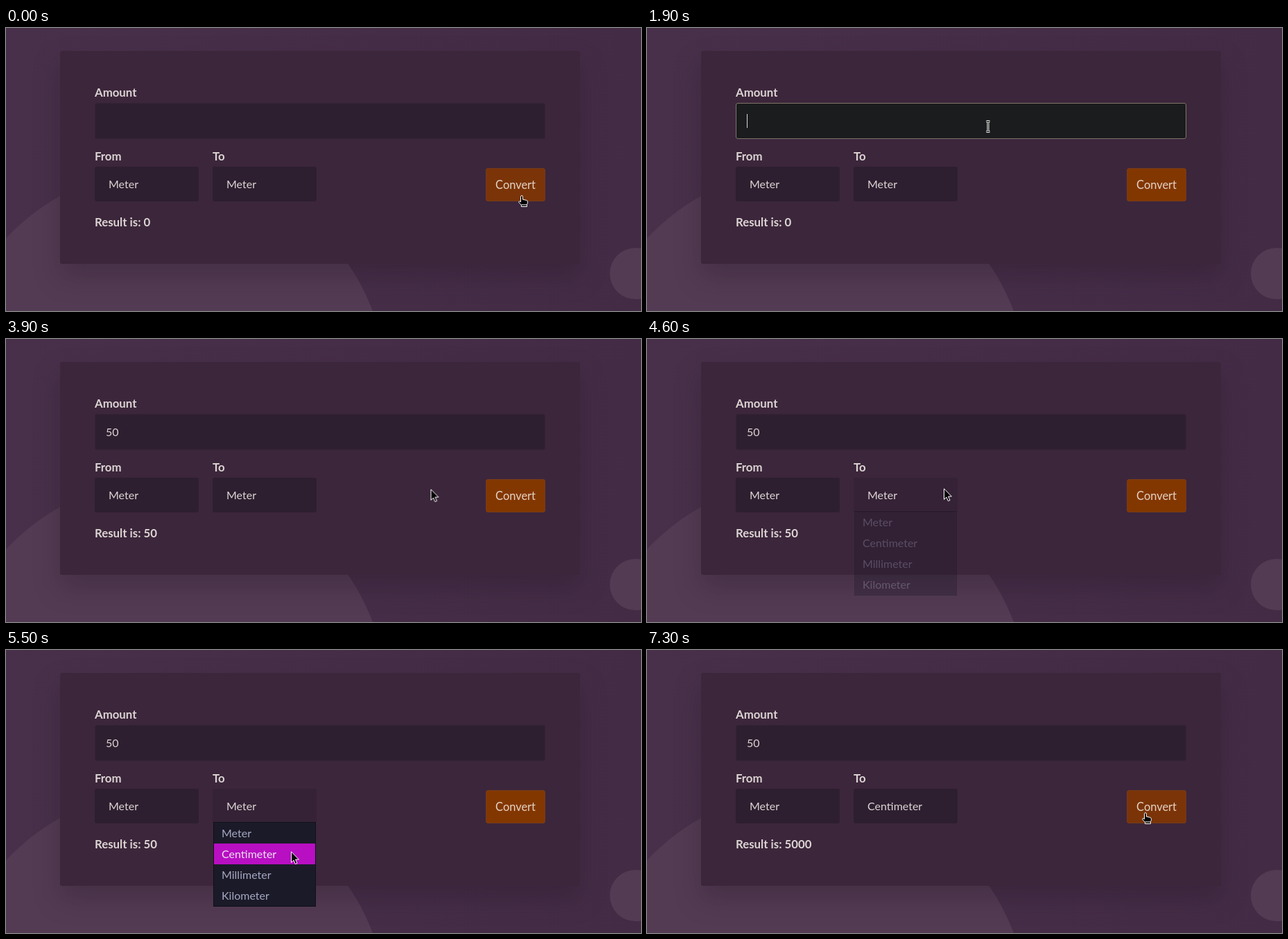
Recreate the animation shown at these times as an HTML page. Size 916 by 408 pixels, loop 8000 ms.

```html
<!DOCTYPE html>
<html lang="en">
<head>
<meta charset="utf-8">
<title>Unit converter</title>
<style>
html, body { margin: 0; width: 100%; height: 100%; overflow: hidden; background: #452d47; }
svg { display: block; width: 916px; height: 408px; }
text { font: 400 16px Lato, "Open Sans", sans-serif; fill: #dcd5d3; }
.label { font-weight: 700; font-size: 16.8px; }
.button-text { font-size: 16.4px; fill: #e4d3c4; }
.menu text { fill: #a6a9c4; }
.menu .hot text { fill: #ece3f0; }
.card { fill: #3c263b; filter: drop-shadow(0 18px 18px rgba(30, 14, 32, .26)); }
.box { fill: #2e1f30; }
.box.amount { stroke: #7f7467; stroke-opacity: 0; }
.button { fill: #833700; stroke: #8a4a18; stroke-opacity: .5; }

/* Every part shares one 8 s clock; 1.25% is a 100 ms tick. */
.anim { animation: 8s step-end -10ms infinite; }
.hidden { opacity: 0; }

.cursor { animation-name: move; }
@keyframes move {
  0% { transform: translate(739px, 241px); }
  2.5% { transform: translate(738px, 240px); }
  11.25% { transform: translate(655px, 212px); }
  12.5% { transform: translate(530px, 141px); }
  13.75% { transform: translate(489px, 133px); }
  30% { transform: translate(570px, 165px); }
  31.25% { transform: translate(668px, 205px); }
  32.5% { transform: translate(704px, 221px); }
  35% { transform: translate(705px, 223px); }
  46.25% { transform: translate(705px, 223px); animation-timing-function: steps(4); }
  51.25% { transform: translate(520px, 209px); animation-timing-function: steps(3); }
  55% { transform: translate(430px, 213px); animation-timing-function: steps(2); }
  57.5% { transform: translate(428px, 215px); }
  60% { transform: translate(428px, 215px); animation-timing-function: steps(7); }
  68.75% { transform: translate(411px, 290px); }
  75% { transform: translate(425px, 292px); }
  76.25% { transform: translate(469px, 294px); animation-timing-function: steps(4); }
  81.25% { transform: translate(620px, 262px); animation-timing-function: steps(3); }
  85%, 100% { transform: translate(714px, 234px); }
}

.hand { animation-name: hand; }
@keyframes hand {
  0%, 32.5%, 85%, 100% { opacity: 1; }
  11.25%, 47.5% { opacity: 0; }
}
.arrow { animation-name: arrow; }
@keyframes arrow {
  0%, 12.5%, 32.5%, 85%, 100% { opacity: 0; }
  11.25%, 30%, 47.5% { opacity: 1; }
}
.beam { animation-name: beam; }
@keyframes beam {
  12.5% { opacity: 1; }
  30% { opacity: 0; }
}

.button { animation-name: button; }
@keyframes button {
  0%, 32.5%, 85%, 100% { fill: #7b3408; }
  11.25%, 47.5% { fill: #833700; }
}

.amount { animation-name: amount; }
@keyframes amount {
  12.5% { fill: #332135; stroke-opacity: 0; }
  17.5% { fill: #332135; stroke-opacity: 1; animation-timing-function: steps(5); }
  23.75% { fill: #1a1c1d; stroke-opacity: 1; }
  37.5% { fill: #1a1c1d; stroke-opacity: 1; animation-timing-function: steps(5); }
  43.75%, 100% { fill: #2e1f30; stroke-opacity: 0; }
}

.caret { animation-name: caret; }
@keyframes caret {
  17.5% { opacity: 1; transform: none; }
  25% { opacity: 0; transform: none; }
  26.25% { opacity: 1; transform: translateX(10px); }
  28.75% { opacity: 1; transform: translateX(19px); }
  32.5% { opacity: 0; transform: none; }
}
.five { animation-name: five; }
@keyframes five { 26.25% { opacity: 1; } 28.75% { opacity: 0; } }
.fifty { animation-name: fifty; }
@keyframes fifty { 28.75%, 100% { opacity: 1; } }

.result0 { animation-name: result0; }
@keyframes result0 { 38.75%, 100% { opacity: 0; } }
.result50 { animation-name: result50; }
@keyframes result50 { 38.75% { opacity: 1; } 91.25% { opacity: 0; } }
.result5000 { animation-name: result5000; }
@keyframes result5000 { 91.25%, 100% { opacity: 1; } }

.to { animation-name: to; }
@keyframes to { 55% { fill: #352236; } 75% { fill: #2e1f30; } }
.to-meter { animation-name: to-meter; }
@keyframes to-meter { 75%, 100% { opacity: 0; } }
.to-centi { animation-name: to-centi; }
@keyframes to-centi { 75%, 100% { opacity: 1; } }

.menu { animation-name: menu; }
@keyframes menu {
  57.5% { opacity: .3; }
  58.75% { opacity: 1; }
  75% { opacity: 0; }
}
.hot-meter { animation-name: hot-meter; }
@keyframes hot-meter { 65% { opacity: 1; } 67.5% { opacity: 0; } }
.hot-centi { animation-name: hot-centi; }
@keyframes hot-centi { 67.5% { opacity: 1; } 75% { opacity: 0; } }
</style>
</head>
<body>
<svg viewBox="0 0 916 408">
  <defs>
    <linearGradient id="wall">
      <stop stop-color="#48304a"/>
      <stop offset="1" stop-color="#432b45"/>
    </linearGradient>
  </defs>
  <rect width="916" height="408" fill="url(#wall)"/>
  <g fill="#533b53">
    <circle cx="232" cy="519.7" r="317.3"/>
    <circle cx="908" cy="354" r="37"/>
  </g>
  <rect class="card" x="78" y="33" width="750" height="307" rx="3"/>

  <text class="label" x="128" y="99">Amount</text>
  <rect class="box amount anim" x="128.5" y="108.5" width="649" height="51" rx="2.5"/>
  <text class="five anim hidden" x="144" y="140">5</text>
  <text class="fifty anim hidden" x="144" y="140">50</text>
  <rect class="caret anim hidden" x="144" y="124" width="1" height="20" fill="#e0d8d4"/>

  <text class="label" x="128" y="191">From</text>
  <rect class="box" x="128" y="200" width="150" height="50" rx="3"/>
  <text x="148" y="231">Meter</text>

  <text class="label" x="298" y="191">To</text>
  <rect class="box to anim" x="298" y="200" width="150" height="50" rx="3"/>
  <text class="to-meter anim" x="318" y="231">Meter</text>
  <text class="to-centi anim hidden" x="318" y="231">Centimeter</text>

  <rect class="button anim" x="692.5" y="202.5" width="85" height="47" rx="2.5"/>
  <text class="button-text" x="735" y="232" text-anchor="middle">Convert</text>

  <text class="label result0 anim" x="128" y="286">Result is: 0</text>
  <text class="label result50 anim hidden" x="128" y="286">Result is: 50</text>
  <text class="label result5000 anim hidden" x="128" y="286">Result is: 5000</text>

  <g class="menu anim hidden">
    <rect x="299.5" y="248.5" width="147" height="121" fill="#1b1a28" stroke="#10101a"/>
    <text x="311" y="270">Meter</text>
    <text x="311" y="300">Centimeter</text>
    <text x="311" y="330">Millimeter</text>
    <text x="311" y="360">Kilometer</text>
    <g class="hot hot-meter anim hidden">
      <rect x="300" y="249" width="146" height="30" fill="#b80fc3"/>
      <text x="311" y="270">Meter</text>
    </g>
    <g class="hot hot-centi anim hidden">
      <rect x="300" y="279" width="146" height="30" fill="#b80fc3"/>
      <text x="311" y="300">Centimeter</text>
    </g>
  </g>

  <g class="cursor anim" stroke="#fff" stroke-linejoin="round">
    <g class="hand anim">
      <path d="M3.5 9.8V2.3Q3.5.6 5 .6T6.4 2.3V6.2L11.6 7.3Q13.4 7.8 13.4 9.5V11.5L12.4 13.6V16.5H4.4V14.2L.9 10.6Q.3 8.8 1.8 8.7Z"/>
      <path d="M4.6 13.9H12.2" fill="none"/>
    </g>
    <path class="arrow anim hidden" d="M.5.8V16.3L4 13 6.4 18.6 9 17.5 6.6 12H11.4Z"/>
    <g class="beam anim hidden" fill="none">
      <path d="M.5 1.5H5.5M.5 16.5H5.5M3 1.5V16.5" stroke-width="3"/>
      <path d="M.5 1.5H5.5M.5 16.5H5.5M3 1.5V16.5" stroke="#000"/>
    </g>
  </g>
</svg>
</body>
</html>
```
